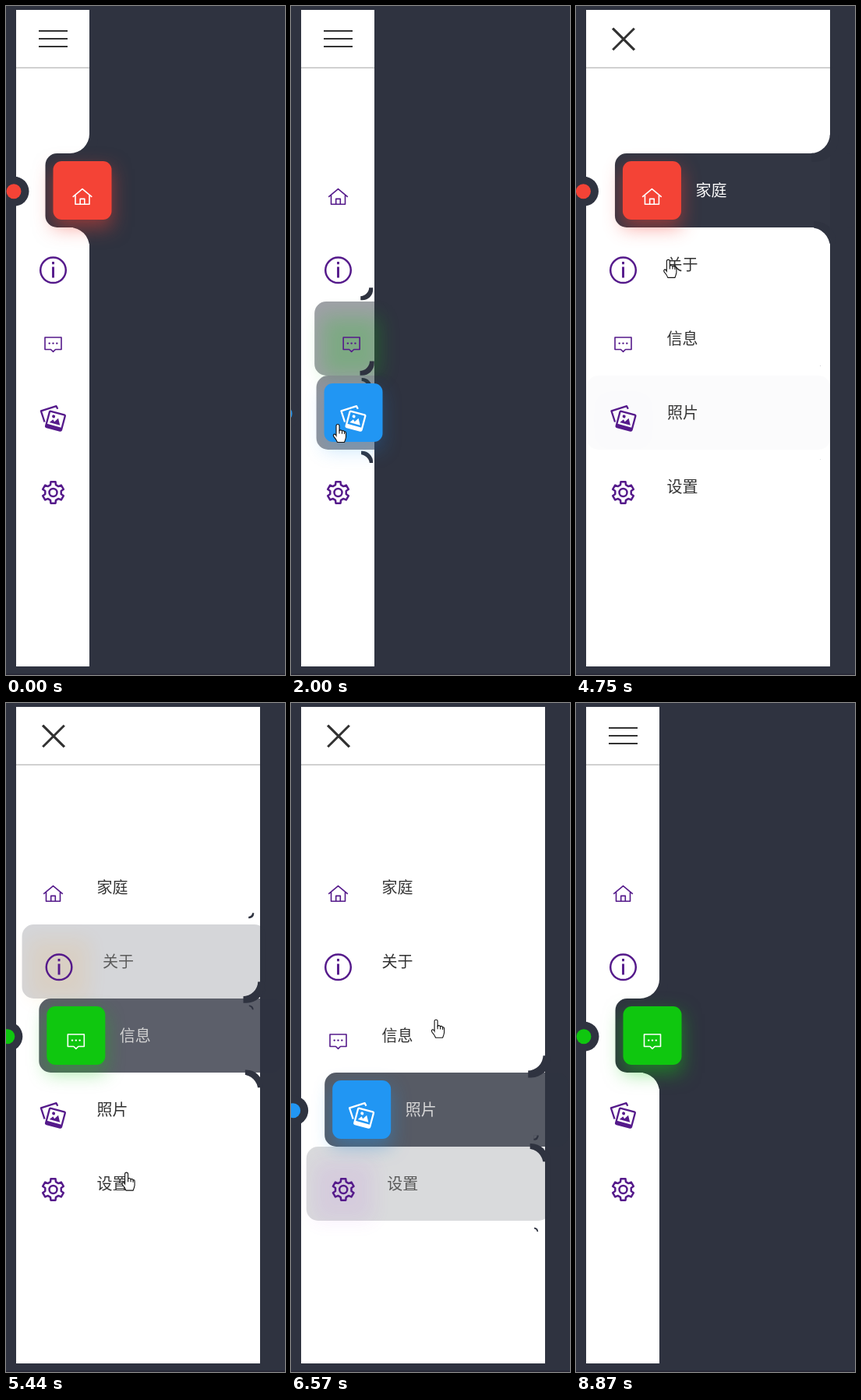
Recreate the animation shown at these times as an HTML page with a canvas. Size 358 px wide and 858 px high, loop 9.41 s.

```html
<!DOCTYPE html>
<html lang="zh">
<head>
<meta charset="utf-8">
<title>Sidebar menu</title>
<style>
html, body { margin: 0; width: 100%; height: 100%; overflow: hidden; background: #2f3340; }
canvas { display: block; width: 358px; height: 858px; }
</style>
</head>
<body>
<canvas id="stage"></canvas>
<script>
const W = 358, H = 858, LOOP = 9410, FADE = 500;
const DARK = '#2f3340', PURPLE = '#551a8b', INK = '#333';
const BAR = { x: 13, y: 5, h: 842, narrow: 94, wide: 313 };
const ITEM = { top: 189, h: 95, shift: 37.5 };
const OPEN_AT = 2880, CLOSE_AT = 7371;

const canvas = document.getElementById('stage');
const ctx = canvas.getContext('2d');
const dpr = window.devicePixelRatio || 1;
canvas.width = W * dpr;
canvas.height = H * dpr;

const items = [
  { label: '家庭', color: '#f44336', icon: homeIcon },
  { label: '关于', color: '#ffa117', icon: infoIcon },
  { label: '信息', color: '#0fc70f', icon: messageIcon },
  { label: '照片', color: '#2196f3', icon: photosIcon },
  { label: '设置', color: '#b145e9', icon: gearIcon }
];

const clamp = v => Math.max(0, Math.min(1, v));
const mix = (a, b, k) => a + (b - a) * k;
const smooth = k => k * k * (3 - 2 * k);
const rowTop = index => ITEM.top + index * ITEM.h;

// The pointer drifts right and up within the rows as time passes
const edge = (time, x) => ({ time, x, y: 862 });
const toggle = (time, y) => ({ time, x: 73, y });
const press = (time, index) => ({
  time, index,
  x: 60 + 87 * Math.max(0, (time - 1849) / 3850) ** 1.5,
  y: rowTop(index) + 62 - (time - 1849) / 140
});
const stops = [
  edge(200, 279), press(920, 1), press(1440, 2), press(1849, 3),
  toggle(OPEN_AT, 43), toggle(3680, 58),
  press(4330, 0), press(4800, 1), press(5201, 2), press(5920, 4), press(6320, 3), press(6780, 2),
  toggle(CLOSE_AT, 32), edge(8870, 350)
];
const clicks = [press(-LOOP, 0), ...stops.filter(s => 'index' in s)];

// CSS "ease": cubic-bezier(.25, .1, .25, 1)
function ease(x) {
  x = clamp(x);
  let lo = 0, hi = 1, s = x;
  for (let i = 0; i < 22; i++) {
    s = (lo + hi) / 2;
    const bx = .75 * s * (1 - s) * (1 - s) + .75 * s * s * (1 - s) + s ** 3;
    if (bx < x) lo = s; else hi = s;
  }
  return .3 * s * (1 - s) * (1 - s) + 3 * s * s * (1 - s) + s ** 3;
}
const since = (t, start) => ease((t - start) / FADE);

// An interrupted transition reverses from where it was, in proportionally less time
function activation(index, t) {
  let value = 0;
  clicks.forEach((click, i) => {
    if (click.index !== index || t < click.time) return;
    const end = clicks[i + 1] ? clicks[i + 1].time : Infinity;
    const peak = since(Math.min(t, end), click.time);
    value = t < end ? peak : peak * (1 - ease((t - end) / (FADE * peak)));
  });
  return value;
}

const activeIndex = t => clicks.filter(c => c.time <= t).pop().index;

function at(x, y, draw) {
  ctx.save();
  ctx.translate(x, y);
  draw();
  ctx.restore();
}

function rounded(x, y, w, h, r) {
  const p = new Path2D();
  p.roundRect(x, y, w, h, r);
  return p;
}

function disc(x, y, r, fill) {
  ctx.beginPath();
  ctx.arc(x, y, r, 0, 7);
  if (fill) { ctx.fillStyle = fill; ctx.fill(); } else ctx.stroke();
}

function line(d, width) {
  ctx.lineWidth = width;
  ctx.stroke(new Path2D(d));
}

function homeIcon() {
  line('M-12.3 .8L0-9.4 12.3 .8M-9-1.6V10.2H9V-1.6M-2.8 10.2V3.4H2.8V10.2', 1.6);
}

function infoIcon() {
  ctx.lineWidth = 2.5;
  disc(0, -.2, 16.3);
  line('M0-10.9v3.2M0-4.6v14', 2.9);
}

function messageIcon(color) {
  line('M-10.5-9H10.5V6.5H3L0 9.3-3 6.5H-10.5Z', 1.6);
  for (const x of [-4.8, 0, 4.8]) disc(x, -1.4, 1.2, color);
}

function photosIcon(color) {
  line('M-11 4.5L-15.6-9.6 4-15.8 5.8-12.2', 2.3);
  at(3, 3, () => {
    ctx.rotate(Math.PI / 12);
    ctx.lineWidth = 2.3;
    ctx.stroke(rounded(-10.3, -10.3, 20.6, 21, 1.5));
    ctx.fill(new Path2D('M-10.3 6.5H10.3V10.7H-10.3ZM-7 4L-3.4-.8-1 1.6 2.6-4 7 4Z'));
    disc(-3.8, -4.8, 2, color);
  });
}

function gearIcon() {
  ctx.lineWidth = 2.5;
  ctx.beginPath();
  for (let i = 0; i < 6; i++) {
    const a = i * Math.PI / 3 - Math.PI / 2;
    for (const [da, r] of [[-.34, 10.4], [-.22, 14], [.22, 14], [.34, 10.4]])
      ctx.lineTo(r * Math.cos(a + da), r * Math.sin(a + da));
  }
  ctx.closePath();
  ctx.stroke();
  disc(0, 0, 5);
}

// Concave corner: a hard box-shadow around a 25px quarter-round box
function corner(x, y, scale, side) {
  const above = side < 0, spread = above ? 5 : 2, size = 25 + 2 * spread;
  const radii = r => above ? [0, 0, r, 0] : [0, r, 0, 0];
  at(x, y, () => {
    ctx.scale(scale, scale);
    const outside = new Path2D();
    outside.rect(-60, -60, 120, 120);
    outside.addPath(rounded(-12.5, -12.5, 25, 25, radii(25)));
    ctx.clip(outside, 'evenodd');
    ctx.fillStyle = DARK;
    ctx.fill(rounded(-6.5 - spread, -12.5 - 6 * side - spread, size, size, radii(25 + spread)));
  });
}

// Only the blurred shadow of an off-stage square is visible
function glow(x, y, color, alpha) {
  ctx.save();
  ctx.globalAlpha = alpha;
  ctx.shadowColor = color;
  ctx.shadowBlur = 25 * dpr;
  ctx.shadowOffsetX = 1000 * dpr;
  ctx.fillStyle = color;
  ctx.fillRect(x - 1000, y, 75, 75);
  ctx.restore();
}

function drawItem(item, index, t, barWidth, open) {
  const a = activation(index, t), active = activeIndex(t) === index;
  const top = rowTop(index), shift = ITEM.shift * a, left = BAR.x + shift;

  if (a > .002) {
    ctx.globalAlpha = a;
    ctx.fillStyle = DARK;
    ctx.fill(rounded(left, top, barWidth, ITEM.h, 15));
    ctx.globalAlpha = 1;
    const cx = BAR.x + barWidth - 12.5;
    corner(cx, top - 12.5, a, -1);
    corner(cx, top + ITEM.h + 12.5, a, 1);
    disc(shift - 27, top + 48.7, 19, DARK);
    disc(shift - 27.5, top + 48.7, 9.5, item.color);
    glow(left + 10, top + 20, item.color, a / 2);
  }
  if (active) {
    ctx.fillStyle = item.color;
    ctx.fill(rounded(left + 10, top + 10, 75, 75, 11));
  }

  const color = active ? '#fff' : PURPLE;
  at(left + 47.5, top + 55, () => {
    ctx.strokeStyle = ctx.fillStyle = color;
    ctx.lineJoin = 'round';
    item.icon(color);
  });

  const shade = Math.round(mix(51, 255, a));
  ctx.globalAlpha = open;
  ctx.fillStyle = `rgb(${shade},${shade},${shade})`;
  ctx.font = '20px "Noto Sans CJK SC", "Noto Sans CJK", sans-serif';
  ctx.fillText(item.label, left + 103.5, top + 54.5);
  ctx.globalAlpha = 1;
}

function drawToggle(open) {
  const gap = 10 * (1 - open), thick = 2 + open, half = 18.5 + open;
  const x = 60.5 + open / 2, y = 42 + open / 2;
  const stroke = dy => ctx.fillRect(-half, dy - thick / 2, half * 2, thick);
  ctx.fillStyle = INK;
  at(x, y - gap, () => {
    ctx.rotate(open * Math.PI / 4);
    stroke(0);
    stroke(gap);
  });
  at(x, y + gap, () => {
    ctx.rotate(-open * Math.PI / 4);
    stroke(0);
  });
}

const ARROW = new Path2D('M0 0V16L3.8 12.6 6.3 18.3 8.8 17.2 6.4 11.6H11.5Z');
const HAND = new Path2D('M-2 2.5Q-2 .5 0 .5T2 2.5V8.5Q4 7 5.5 9 7.5 8 8.5 10 10.5 9.5 10.5 12V17' +
  'Q10 20 8.5 23.5H-.5Q-2 19.5-5 16.5-6.5 14-4.5 13-3 13-2 15Z');
const KNUCKLES = new Path2D('M2 8.5v4M5.5 9.3v3.4M8.5 10.3v2.8');

function drawPointer(t, barWidth) {
  const next = stops.findIndex(s => s.time > t);
  if (next < 1) return;
  const from = stops[next - 1], to = stops[next];
  // Row-to-row moves are quick and early, all others slow and late
  const [begin, end] = 'index' in from && 'index' in to ? [.05, .34] : [.2, .87];
  const part = (t - from.time) / (to.time - from.time);
  const k = smooth(clamp((part - begin) / (end - begin)));
  const x = mix(from.x, to.x, k), y = mix(from.y, to.y, k);
  const onItem = x > BAR.x && x < BAR.x + barWidth && y > ITEM.top && y < rowTop(items.length);
  const hand = onItem || (x > 40 && x < 84 && y < 79), shape = hand ? HAND : ARROW;
  at(x, y, () => {
    ctx.fillStyle = '#fff';
    ctx.strokeStyle = '#111';
    ctx.lineWidth = 1.1;
    ctx.fill(shape);
    ctx.stroke(shape);
    if (hand) ctx.stroke(KNUCKLES);
  });
}

function fillBox(color, x, y, w, h) {
  ctx.fillStyle = color;
  ctx.fillRect(x, y, w, h);
}

function draw(t) {
  const open = since(t, OPEN_AT) * (1 - since(t, CLOSE_AT));
  const barWidth = mix(BAR.narrow, BAR.wide, open);
  ctx.setTransform(dpr, 0, 0, dpr, 0, 0);
  fillBox(DARK, 0, 0, W, H);
  fillBox('#272634', 0, 856.5, W, 1.5);
  fillBox('#fff', BAR.x, BAR.y, barWidth, BAR.h);
  fillBox('#b4b4b4', BAR.x, 78.6, barWidth, 1.2);
  items.forEach((item, i) => drawItem(item, i, t, barWidth, open));
  drawToggle(open);
  drawPointer(t, barWidth);
}

const start = performance.now();
function tick() {
  draw((performance.now() - start) % LOOP);
  requestAnimationFrame(tick);
}
tick();
</script>
</body>
</html>
```
